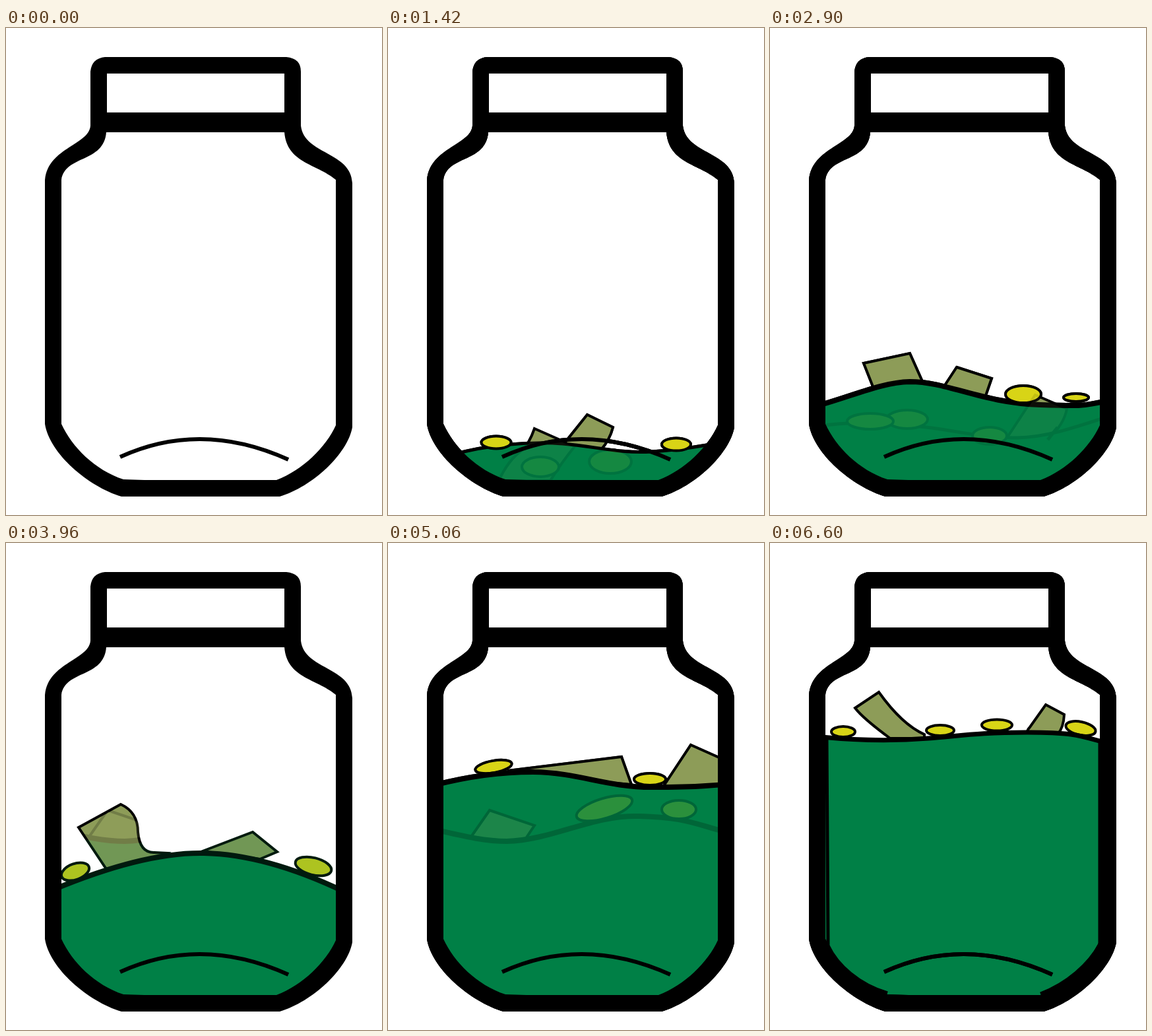
Write an HTML page with a canvas that moves like this. It is 570x738 px and loops after 6.66 s.

```html
<!DOCTYPE html>
<html>
<head>
<meta charset="utf-8">
<title>Savings jar</title>
<style>
  html, body { margin: 0; width: 100%; height: 100%; overflow: hidden; background: #fff; }
  canvas { display: block; }
</style>
</head>
<body>
<canvas id="stage" width="570" height="738"></canvas>
<script>
const W = 570, H = 738;
const GREEN = '#008046', GOLD = '#d8d416', PAPER = '#8d9c58';

const jar = new Path2D(
  'M150 44H425Q447 46 447 66V148C452 192 523 187 525 235V605' +
  'C518 645 465 695 415 710H175C125 695 66 645 59 600V235' +
  'C59 182 126 178 128 148V66Q130 46 150 44Z' +
  'M153 69V128H422V69Z' +
  'M152 158C148 205 90 192 84 230V600C100 635 135 670 178 684' +
  'L210 685H410C450 670 485 635 500 602V230C470 205 426 205 422 158Z');
const inside = new Path2D('M72 100H512V605Q488 664 412 698H176Q98 664 72 605Z');
const glint = new Path2D('M173 650Q295.5 594 428 654');

// Coins are [x, y, rx, ry, degrees]; `top` coins lie in front of the surface.
const levels = [
  {},
  {
    bills: ['M222 607L283 634Q262 660 246 686H168Q182 655 203 640Q214 630 222 607Z'],
    coins: [[231, 665, 28, 15, 0], [337, 657, 32, 18, 0]]
  },
  {
    wave: 'M100 646C150 632 215 626 265 630S350 645 400 642S470 634 495 630', width: 5,
    bills: ['M302 586L341 605Q336 625 322 640H262L270 626Z'],
    top: [[164, 628, 22.5, 9.5, 0], [437, 631, 22, 9.5, 0]]
  },
  {
    wave: 'M70 604C130 594 200 600 245 606S330 622 375 621S460 606 515 588', width: 5,
    bills: ['M402 556L450 577Q446 600 422 623H358Z'],
    top: [[208, 593, 31, 14, 0], [152, 596, 35, 12, 0], [333, 618, 26, 13, 0]],
    edge: 'M436 605L421 624'
  },
  {
    wave: 'M70 573C130 556 170 537 212 536C270 536 320 568 410 571S470 570 512 566', width: 8,
    bills: ['M142 508L212 493L233 540L157 546Z', 'M283 514L336 531L326 560L264 543Z'],
    coins: [[464, 560, 19, 6, 0]],
    top: [[384, 555, 27, 13, 0]]
  },
  {
    wave: 'M70 526C180 480 250 469 300 470S420 484 512 528', width: 8,
    bills: ['M110 431L174 396Q200 408 200 438Q203 470 225 469L245 470L232 480L152 494Z',
            'M374 438L411 468L385 479L298 467Z'],
    top: [[105, 498, 22, 12, -20], [466, 490, 28, 13, 14]]
  },
  {
    wave: 'M70 434C120 446 150 452 180 452C250 450 310 412 380 414S460 424 512 438', width: 8,
    bills: ['M124 448L154 405L222 428L206 452Z'],
    top: [[328, 402, 44, 15, -17], [441, 404, 26, 14, 0]]
  },
  {
    wave: 'M70 367C120 354 170 347 220 347C290 348 330 370 400 370S460 369 512 366', width: 8,
    bills: ['M190 344L354 324L369 366L300 360Z', 'M459 306L515 331V368H418Z'],
    coins: [[160, 339, 28, 9, -10], [397, 358, 24, 9, 0]]
  },
  {
    wave: 'M78 294C130 299 190 300 240 296S320 287 390 287S470 292 506 302', width: 7,
    bills: ['M129 250L165 226Q200 275 234 290V296H182Q140 265 129 250Z',
            'M418 245L446 260Q445 280 436 290H391Q388 285 394 279Z'],
    coins: [[111, 286, 18, 8, 0], [258, 284, 21, 8, 0], [344, 276, 23, 8.5, 0], [471, 281, 23, 10, 12]],
    wall: 'M86 297L88 610C102 640 135 669 178 682M500 302V608C484 638 450 668 410 683'
  }
];

function paint(g, path, fill, width) {
  if (fill) {
    g.fillStyle = fill;
    g.fill(path);
  }
  g.lineWidth = width;
  g.stroke(path);
}

function drawCoin(g, [x, y, rx, ry, deg]) {
  const path = new Path2D();
  path.ellipse(x, y, rx, ry, deg * Math.PI / 180, 0, 2 * Math.PI);
  paint(g, path, GOLD, 4);
}

function render({ wave, width, bills = [], coins = [], top = [], edge, wall }) {
  const canvas = document.createElement('canvas');
  canvas.width = W;
  canvas.height = H;
  const g = canvas.getContext('2d');
  g.save();
  g.clip(inside);
  for (const d of bills) paint(g, new Path2D(d), PAPER, 4);
  for (const c of coins) drawCoin(g, c);
  if (wave) {
    g.fillStyle = GREEN;
    g.fill(new Path2D(wave + 'L540 720H40Z'));
    paint(g, new Path2D(wave), null, width);
  }
  if (edge) paint(g, new Path2D(edge), null, 5);
  for (const c of top) drawCoin(g, c);
  if (wall) paint(g, new Path2D(wall), null, 5);
  g.restore();
  g.fillStyle = '#000';
  g.fill(jar, 'evenodd');
  paint(g, glint, null, 6);
  return canvas;
}

const layers = levels.map(render);
const HOLD = 200, STEP = 60, PERIOD = 740;
const ctx = document.getElementById('stage').getContext('2d');

function put(layer, alpha = 1, mode = 'source-over') {
  ctx.globalAlpha = alpha;
  ctx.globalCompositeOperation = mode;
  ctx.drawImage(layer, 0, 0);
}

// The next level tints what is already there; on bare ground it
// pops in whole once the blend reaches one half.
function show(index, step) {
  const from = layers[index], to = layers[(index + 1) % layers.length];
  const mix = step / 10;
  ctx.clearRect(0, 0, W, H);
  if (mix >= 0.5) put(to);
  put(from);
  if (mix > 0) put(to, mix, mix < 0.5 ? 'source-atop' : 'source-over');
  ctx.globalAlpha = 1;
  ctx.globalCompositeOperation = 'source-over';
}

let start = null, shown = -1;
function tick(now) {
  if (start === null) start = now;
  const t = (now - start) % (PERIOD * layers.length);
  const index = Math.floor(t / PERIOD), u = t % PERIOD;
  const step = u < HOLD ? 0 : Math.floor((u - HOLD) / STEP) + 1;
  const key = index * 10 + step;
  if (key !== shown) {
    show(index, step);
    shown = key;
  }
  requestAnimationFrame(tick);
}
show(0, 0);
requestAnimationFrame(tick);
</script>
</body>
</html>
```
